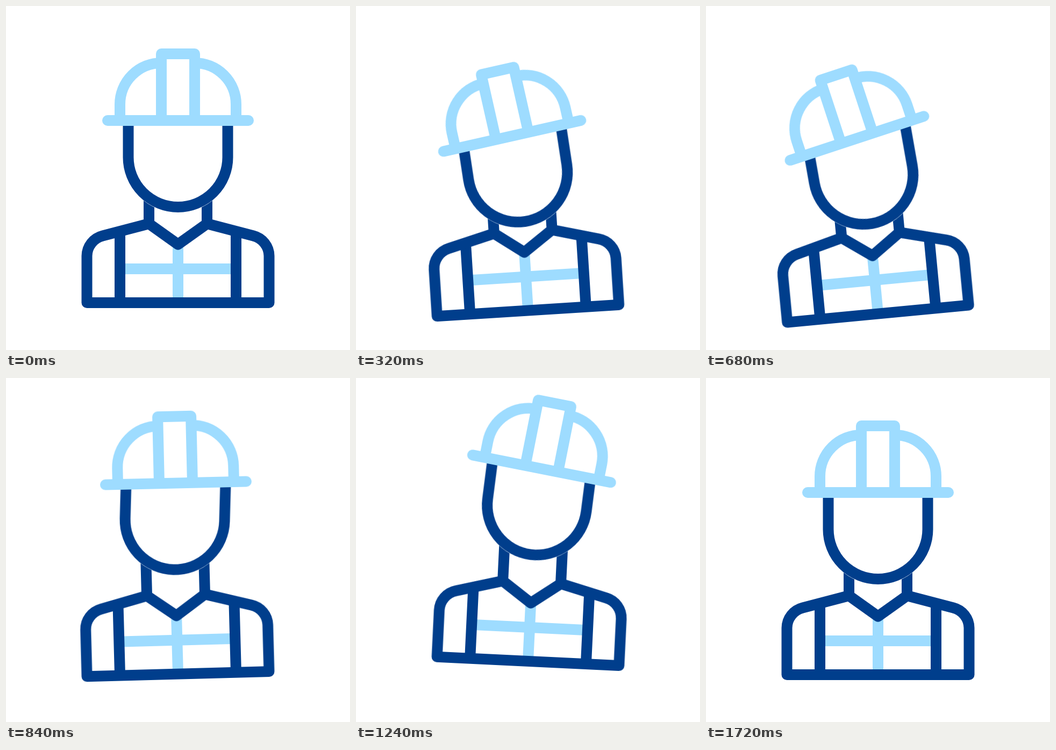
These frames come from a looping animation (640x640 px, 1800 ms). An HTML page:

```html
<!DOCTYPE html>
<html lang="en">
<head>
<meta charset="utf-8">
<title>Worker</title>
<style>
  html, body { margin: 0; height: 100%; overflow: hidden; background: #fff; }
  svg { display: block; width: 100vw; height: 100vh; }

  .line { fill: none; stroke-width: 20; stroke-linejoin: round; }
  .dark { stroke: #003e8c; }
  .light { stroke: #9edcff; }
  .solid { fill: #fff; }
  .edge { fill: #fff; stroke: #fff; stroke-width: 20.8; }
  .round { stroke-linecap: round; }

  .body, .head, .hat {
    animation: 1800ms cubic-bezier(.333, 0, .667, 1) infinite;
  }
  .body { animation-name: sway; transform-origin: 320px 552px; }
  .head { animation-name: nod; transform-origin: 320px 315px; }
  .hat { animation-name: tip; transform-origin: 320px 213px; }

  @keyframes sway {
    0%, 2.222%, 93.333%, 100% { transform: translateY(0) rotate(0deg); }
    30%, 33.333% { transform: translateY(24.5px) rotate(-6.1deg); }
    60%, 64.444% { transform: translateY(-26.8px) rotate(2.95deg); }
  }
  @keyframes nod {
    0%, 2.222%, 82.5%, 100% { transform: translateY(0) rotate(0deg); }
    24.2%, 33.333% { transform: translateY(15.8px) rotate(-6.3deg); }
    52%, 64.444% { transform: translateY(-24px) rotate(5.4deg); }
  }
  @keyframes tip {
    0%, 95.556%, 100% { transform: rotate(0deg); }
    2.222% { transform: rotate(0deg); animation-timing-function: cubic-bezier(.64, 0, .47, 1); }
    33.333% { transform: rotate(-10deg); animation-timing-function: cubic-bezier(.14, 0, .66, 1); }
    64.444% { transform: rotate(4deg); animation-timing-function: cubic-bezier(.64, 0, .47, 1); }
  }
</style>
</head>
<body>
<svg viewBox="0 0 640 640">
  <defs>
    <path id="face" d="M227.5 190V281.5A92.5 92.5 0 0 0 412.5 281.5V190"/>
  </defs>
  <g class="body">
    <path class="line light" d="M320 444V552M212 489H428"/>
    <path class="line dark" d="M212 419V552M428 419V552M266 325V405M374 325V405"/>
    <path class="line dark" d="M150.5 552V465A39 39 0 0 1 180 427.5L266 405L320 443.5L374 405L460 427.5A39 39 0 0 1 489.5 465V552Z"/>
    <g class="head">
      <use href="#face" class="edge"/>
      <use href="#face" class="line dark"/>
      <g class="hat">
        <path class="line light solid" d="M289 213H212V183A77 77 0 0 1 289 106M351 213H428V183A77 77 0 0 0 351 106"/>
        <path class="line light solid round" d="M289 213V89H351V213"/>
        <path class="line light round" d="M189 213H451"/>
      </g>
    </g>
  </g>
</svg>
</body>
</html>
```
